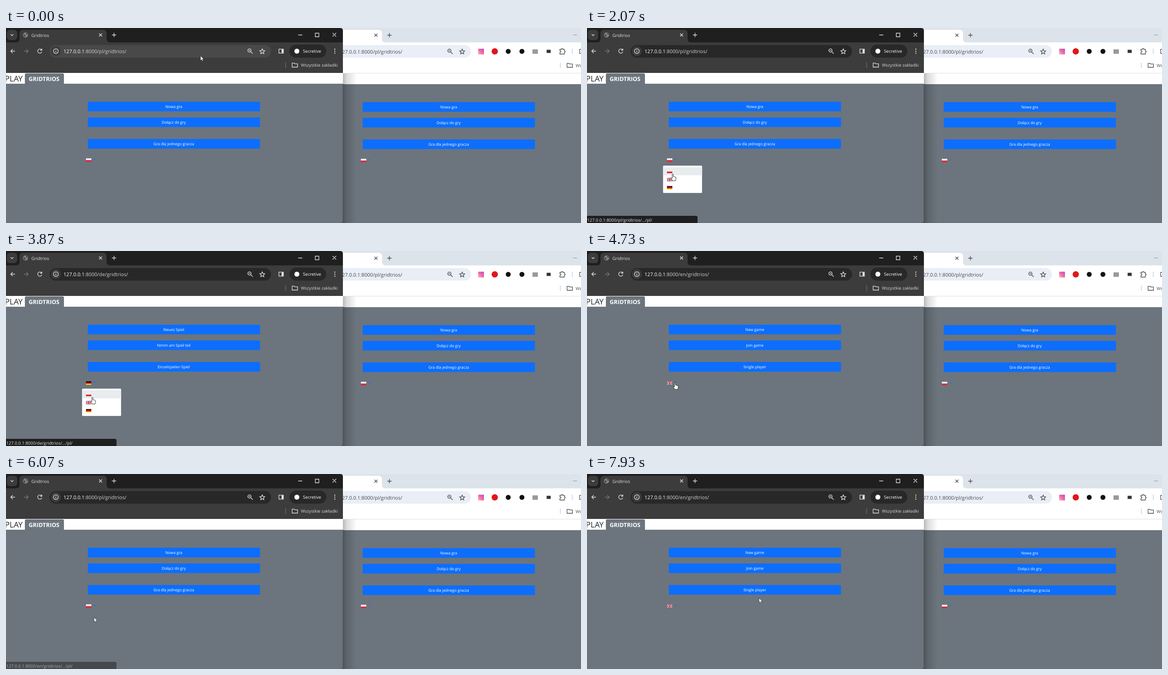
These frames come from a looping animation (1280x434 px, 8000 ms). An HTML page:

```html
<!DOCTYPE html>
<html lang="pl">
<head>
<meta charset="utf-8">
<title>Language switch</title>
<style>
html, body { margin: 0; width: 100%; height: 100%; overflow: hidden; background: #6c757d; }
svg { display: block; text-rendering: geometricPrecision; }
text { font-family: "Open Sans", "Noto Sans", sans-serif; white-space: pre; }
.line { fill: none; stroke: currentColor; stroke-width: 1.3; }
.url { font-size: 11.07px; }
.small { font-size: 9.6px; }
.label { font-size: 8.54px; fill: #fff; text-anchor: middle; }
.light { color: #e3e3e3; }
.dark { color: #444746; }
</style>
</head>
<body>
<svg width="1280" height="434" viewBox="0 0 1280 434">
  <defs>
    <symbol id="pl" viewBox="0 0 12 8"><path fill="#eee" d="M0 0H12V4H0Z"/><path fill="#dc2b42" d="M0 4H12V8H0Z"/></symbol>
    <symbol id="de" viewBox="0 0 12 8"><path fill="#111" d="M0 0H12V3H0Z"/><path fill="#d80b0b" d="M0 2.7H12V5.4H0Z"/><path fill="#f9c51c" d="M0 5.4H12V8H0Z"/></symbol>
    <symbol id="en" viewBox="0 0 12 8">
      <path fill="#1d2f78" d="M0 0H12V8H0Z"/>
      <path stroke="#fff" stroke-width="1.7" d="M0 0L12 8M12 0L0 8"/>
      <path stroke="#cf1b2b" stroke-width=".6" d="M0 0L12 8M12 0L0 8"/>
      <path stroke="#fff" stroke-width="2.8" d="M6 0V8M0 4H12"/>
      <path stroke="#cf1b2b" stroke-width="1.5" d="M6 0V8M0 4H12"/>
    </symbol>
    <g id="cross" class="line"><path d="M-3.3 -3.3L3.3 3.3M3.3 -3.3L-3.3 3.3"/></g>
    <g id="plus" class="line"><path d="M-4.7 0H4.7M0 -4.7V4.7"/></g>
    <g id="zoom" class="line"><circle cx="-1.5" cy="-1.5" r="3.7"/><path d="M1.2 1.2L5.8 5.8M-3.2 -1.5H.2"/></g>
    <path id="star" class="line" d="M0 -5.6L1.6 -1.9 5.7 -1.5 2.6 1.2 3.5 5.2 0 3.1 -3.5 5.2 -2.6 1.2 -5.7 -1.5 -1.6 -1.9Z"/>
    <path id="folder" class="line" d="M-6 -4.3H-1.5L0 -2.8H6V4.5H-6Z"/>
    <g id="panel" class="line"><rect x="-5" y="-4.5" width="10" height="9"/><path d="M3 -4V4" stroke-width="4"/></g>
    <path id="arrow" fill="#fff" stroke="#222" stroke-width=".7" d="M0 0V10.5L2.4 8.3 4 12 5.7 11.3 4.1 7.7H7.4Z"/>
    <path id="hand" fill="#fff" stroke="#111" stroke-width=".9" d="M-1.2 1.2Q-1.2 0 0 0T1.2 1.2V5.6Q2.3 5 3.2 6 4.4 5.4 5.2 6.6 7 6.3 7 8V11Q7 13 5.8 15H-.5Q-1.5 13 -4 9.8 -4.6 8.3 -3 8.2L-1.2 9.8Z"/>
    <linearGradient id="shadow"><stop stop-opacity=".3"/><stop offset=".3" stop-opacity=".14"/><stop offset="1" stop-opacity="0"/></linearGradient>
    <linearGradient id="pink" x1="1" y1="0" x2="0" y2="1"><stop stop-color="#b04fe0"/><stop offset=".5" stop-color="#f06aa5"/><stop offset="1" stop-color="#fcc0a4"/></linearGradient>
  </defs>

  <rect width="1280" height="434" fill="#6c757d"/>

  <!-- back window -->
  <g class="dark">
    <path fill="#dce3eb" d="M740 0H1280V33H740Z"/>
    <path fill="#fff" d="M740 4H829Q837 4 837 12V25Q837 32 845 32H1280V125H740Z"/>
    <path fill="#e9eef7" d="M740 38H1021A14 14 0 0 1 1021 66H740Z"/>
    <path stroke="#dcdfe3" d="M740 100.5H1280"/>
    <use href="#cross" x="823.5" y="16"/>
    <use href="#plus" x="853.5" y="16"/>
    <path stroke="#8a9299" d="M1262 15.5H1271"/>
    <text class="url" x="882" y="56.5" text-anchor="end" fill="#474a4f">127.0.0.1:8000/pl/gridtrios/</text>
    <use href="#zoom" x="988.5" y="52"/>
    <use href="#star" x="1015.5" y="52.5"/>
    <rect x="1051" y="46" width="13" height="13" rx="1" fill="url(#pink)"/>
    <circle cx="1088" cy="52" r="7" fill="#e0161b"/>
    <circle cx="1118" cy="52" r="5.5" fill="#111"/>
    <circle cx="1148.5" cy="52" r="5.5" fill="#111"/>
    <rect x="1172" y="47.5" width="12" height="10" rx="1" fill="#999"/>
    <rect x="1203.5" y="48.5" width="9" height="7" fill="#333"/>
    <path class="line" d="M1233 47.5H1236.5Q1236.5 45.5 1238 45.5T1239.500 47.500H1243V51Q1245 51 1245 52.500T1243 54V58H1233V54.500Q1235.500 54 1235.500 52.500T1233 50.500Z"/>
    <path stroke="#b9d3f5" stroke-width="1.500" d="M1260.500 46V58M1234 77V89"/>
    <use href="#panel" x="1282" y="52"/>
    <use href="#folder" x="1255" y="83"/>
    <text class="small" x="1268" y="87" fill="#474a4f">Wszystkie zakładki</text>
    <g id="backPage" transform="translate(612 1)"></g>
    <rect x="749" width="32" y="101" height="333" fill="url(#shadow)"/>
  </g>

  <!-- front window -->
  <path fill="#6c757d" d="M0 100H750V428Q750 434 744 434H0Z"/>
  <path fill="none" stroke="#4c5358" d="M750 124V428Q750 434 744 434"/>
  <path fill="#1f1f1f" d="M0 0H744Q750 0 750 6V33H0Z"/>
  <path fill="#3c3c3c" d="M0 32H22Q30 32 30 25V12Q30 4 38 4H216Q224 4 224 12V25Q224 32 232 32H750V100H0Z"/>
  <path fill="#fff" d="M0 100H750V124H0Z"/>
  <g class="light">
    <rect x="2" y="4" width="23" height="23" rx="7" fill="#3c3c3c"/>
    <path class="line" d="M10.500 14L13.500 17 16.500 14"/>
    <g id="favicon"></g>
    <text class="small" x="56.500" y="19.500" font-size="9.700" fill="#e3e3e3">Gridtrios</text>
    <use href="#cross" x="210.500" y="15.500"/>
    <use href="#plus" x="240.500" y="15.500"/>
    <path class="line" stroke-width="1" d="M650.500 15.500H659.500M688.500 11.500H696.500V19.500H688.500ZM727 11L735 19M735 11L727 19"/>
    <path class="line" d="M20 51.500H10.500M15 47L10.500 51.500 15 56"/>
    <path class="line" color="#777" d="M40 51.500H49.500M45 47L49.500 51.500 45 56"/>
    <path class="line" d="M79 48.500A4.700 4.700 0 1 0 79.700 53M79.800 46V49.500H76"/>
    <rect id="omnibox" x="97" y="38" width="493" height="28" rx="14"/>
    <circle cx="111" cy="51.500" r="11" fill="#3c3c3c"/>
    <circle class="line" cx="111" cy="51.500" r="5.300"/>
    <path class="line" d="M111 50.800V54.500M111 48.300V49.600"/>
    <text class="url" x="128" y="55.500" fill="#fff">127.0.0.1<tspan id="path" fill="#d0d0d0"></tspan></text>
    <use href="#zoom" x="543.500" y="51.500"/>
    <use href="#star" x="570.500" y="52"/>
    <use href="#panel" x="612.500" y="51.500"/>
    <rect x="631" y="37" width="82" height="29" rx="14.500" fill="#282828"/>
    <circle cx="647.500" cy="51.500" r="5.500" fill="#fff"/>
    <text class="small" x="661" y="55" fill="#fff">Secretive</text>
    <path fill="none" stroke="currentColor" stroke-width="2.400" stroke-linecap="round" d="M732 47V47.010M732 51.500V51.510M732 56V56.010"/>
    <path stroke="#6d6d6d" stroke-width="1.300" d="M622.500 76V89"/>
    <use href="#folder" x="643" y="82.500"/>
    <text class="small" x="656.500" y="86" fill="#d5d5d5">Wszystkie zakładki</text>
  </g>
  <text x="37" y="119" text-anchor="end" font-size="17.500" font-weight="500" fill="#212529">PLAY</text>
  <path fill="#6c757d" d="M42 124V104Q42 101 45 101H126Q129 101 129 104V124Z"/>
  <text x="50.500" y="118" font-size="12.800" font-weight="700" fill="#fff">GRIDTRIOS</text>
  <g id="page"></g>
  <g id="overlay"></g>
</svg>

<script>
const STEPS = 120, LOOP = 8000;
const labels = {
  pl: ['Nowa gra', 'Dołącz do gry', 'Gra dla jednego gracza'],
  en: ['New game', 'Join game', 'Single player'],
  de: ['Neues Spiel', 'Nimm am Spiel teil', 'Einzelspieler-Spiel']
};
const items = ['pl', 'en', 'de'], buttonTops = [164, 199, 247];

// Each language switch, in steps: status bubble in, menu open, page load, bubble fade-out.
const visits = [
  { from: 'pl', to: 'de', shown: 25, open: 28, load: 37, fade: 43, gone: 47 },
  { from: 'de', to: 'en', shown: 52, open: 55, load: 62, fade: 68, gone: 71 },
  { from: 'en', to: 'pl', shown: 73, open: 76, load: 84, fade: 89, gone: 93 },
  { from: 'pl', to: 'en', shown: 101, open: 103, load: 110, fade: 115, gone: 119 }
];

// Pointer stops: step, x, y
const stops = [
  [0, 433, 62], [12, 433, 62], [23, 196, 294], [29, 196, 294], [31, 191, 325], [33, 191, 356],
  [43, 191, 356], [44, 189, 347], [50, 196, 293], [56, 196, 293], [59, 191, 337],
  [68, 191, 337], [71, 196, 293], [78, 196, 293], [81, 196, 319], [95, 196, 319],
  [100, 196, 293], [103, 196, 293], [105, 191, 321], [106, 191, 337], [115, 191, 337], [119, 383, 276]
];

const el = id => document.getElementById(id);
const flag = (lang, x, y) => `<use href="#${lang}" x="${x}" y="${y}" width="12" height="8"/>`;
const inside = (p, x0, y0, x1, y1) => p.x >= x0 && p.x < x1 && p.y >= y0 && p.y < y1;

function pointerAt(step) {
  const i = stops.findIndex(s => s[0] >= step);
  if (i < 1) return { x: stops[0][1], y: stops[0][2] };
  const [s0, x0, y0] = stops[i - 1], [s1, x1, y1] = stops[i];
  const u = (step - s0) / (s1 - s0), k = u * u * (3 - 2 * u);
  return { x: x0 + (x1 - x0) * k, y: y0 + (y1 - y0) * k };
}

const pageMarkup = (lang, hovered = -1) => buttonTops.map((y, i) =>
  `<rect x="182" y="${y}" width="383.500" height="21.500" rx="1.500" fill="${i === hovered ? '#0b5ed7' : '#0d6efd'}"/>
   <text class="label" x="373.500" y="${y + 14}">${labels[lang][i]}</text>`).join('') +
  flag(lang, 178, 290) + '<path fill="#0d6efd" d="M194.500 291.500H199.500L197 294Z"/>';

const menuMarkup = hovered =>
  '<rect x="169" y="306" width="87.500" height="61.500" rx="2" fill="#fff" stroke="#5d656c" stroke-width=".6"/>' +
  items.map((lang, i) =>
    (i === hovered ? `<rect x="169.300" y="${310 + 18 * i}" width="87" height="18" fill="#e9ecef"/>` : '') +
    flag(lang, 178, 315.500 + 18 * i)).join('');

const statusMarkup = (text, opacity) =>
  `<g opacity="${opacity}"><path fill="#1f1f1f" d="M0 418H242.500Q246 418 246 421.500V434H0Z"/>
   <text class="small" x=".5" y="430.500" fill="#e3e3e3">${text}</text></g>`;

const globe = `<circle cx="43.500" cy="15.500" r="5.700" fill="#80868b"/>
  <path fill="#4a4d50" d="M39 13L42.500 15 44 18 42.500 20 39.500 18ZM43 10.500L47.500 12 48.500 16 45.500 14.500Z"/>`;
const spinner = step => `<circle cx="43.500" cy="15.500" r="5" fill="none" stroke="#a8c7fa" stroke-width="1.400"
  stroke-dasharray="21 11" transform="rotate(${step * 80} 43.500 15.500)"/>`;

function draw(step) {
  const pointer = pointerAt(step);
  const started = visits.filter(v => step >= v.shown).pop();
  const loaded = visits.filter(v => step > v.load).pop();
  const lang = loaded ? loaded.to : 'pl';
  const menuOpen = started && step >= started.open && step <= started.load;
  const loading = started && step >= started.load && step < started.load + 3;

  let item = -1, status = '';
  if (started) {
    const { y } = pointerAt(Math.min(step, started.load));
    item = y < 310 ? -1 : Math.floor((y - 310) / 18);
    const target = item < 0 ? '#' : `.../${items[item]}/`;
    const opacity = Math.min(1, (started.gone - step) / (started.gone - started.fade));
    if (opacity > 0) status = statusMarkup(`127.0.0.1:8000/${started.from}/gridtrios/${target}`, opacity);
  }

  const button = buttonTops.findIndex(y => inside(pointer, 182, y, 565, y + 21));
  const onLink = button >= 0 || inside(pointer, 172, 288, 204, 301) ||
    (menuOpen && inside(pointer, 169, 310, 256, 364));

  el('omnibox').setAttribute('fill', inside(pointer, 97, 38, 590, 66) ? '#494949' : '#282828');
  el('path').textContent = `:8000/${lang}/gridtrios/`;
  el('favicon').innerHTML = loading ? spinner(step) : globe;
  el('page').innerHTML = pageMarkup(lang, button);
  el('overlay').innerHTML = (menuOpen ? menuMarkup(item) : '') + status +
    `<use href="#${onLink ? 'hand' : 'arrow'}" x="${pointer.x}" y="${pointer.y}"/>`;
}

let shownStep = -1;
function tick(now) {
  // The small lead absorbs timestamps rounded just below a step boundary.
  const step = Math.floor((now + 4) % LOOP / LOOP * STEPS);
  if (step !== shownStep) draw(shownStep = step);
  requestAnimationFrame(tick);
}

el('backPage').innerHTML = pageMarkup('pl');
tick(performance.now());
</script>
</body>
</html>
```
